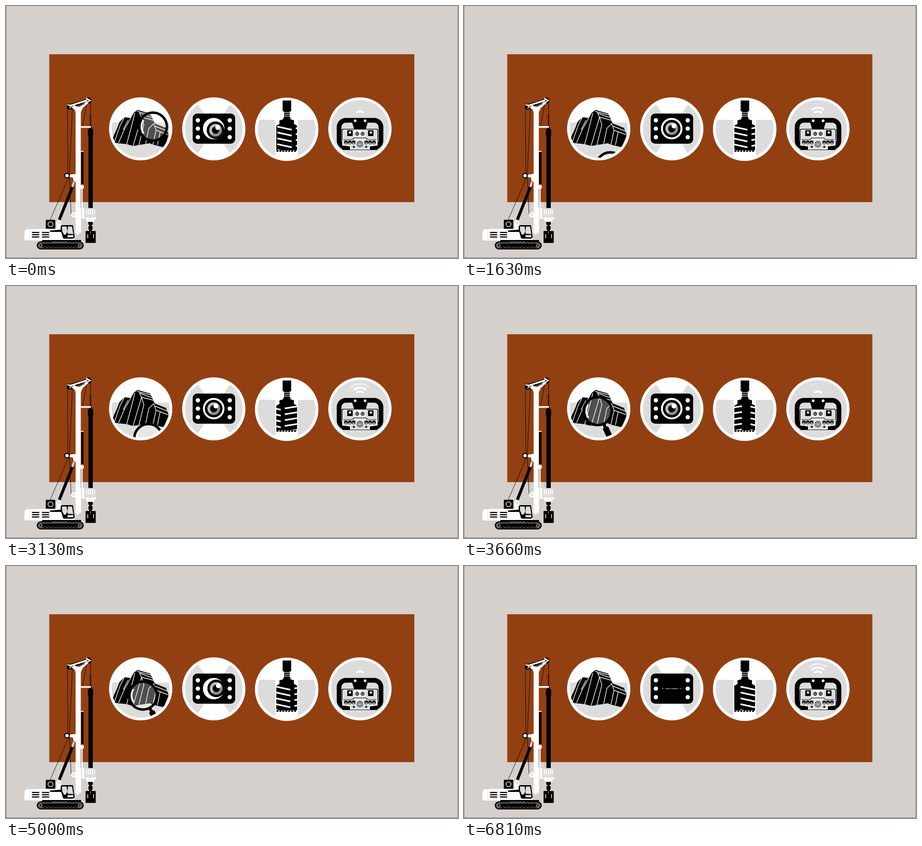
These frames come from a looping animation (1000 px wide and 560 px high, 6830 ms). An HTML page with a canvas:

```html
<!DOCTYPE html>
<html lang="en">
<head>
<meta charset="utf-8">
<title>Drilling rig</title>
<style>
html, body { margin: 0; width: 100%; height: 100%; overflow: hidden; background: #d5d0cc; }
canvas { display: block; width: 100vw; height: 100vh; }
</style>
</head>
<body>
<canvas id="stage"></canvas>
<script>
const LOOP = 6830, CYCLE = 4500, WIFI = 1226, SPIN = 838;
const BLACK = '#000', WHITE = '#fff', GREY = '#dcdcdc', BG = '#d5d0cc', RUST = '#924012';

const canvas = document.getElementById('stage');
const ctx = canvas.getContext('2d');
const dpr = Math.max(1, window.devicePixelRatio || 1);
canvas.width = 1000 * dpr;
canvas.height = 560 * dpr;

const clamp = v => Math.max(0, Math.min(1, v));
const ramp = (v, a, b) => clamp((v - a) / (b - a));

function rect(x, y, w, h, color) {
  ctx.fillStyle = color;
  ctx.fillRect(x, y, w, h);
}
function round(x, y, w, h, r, color) {
  ctx.beginPath();
  ctx.roundRect(x, y, w, h, r);
  ctx.fillStyle = color;
  ctx.fill();
}
function disc(x, y, r, color) {
  ctx.beginPath();
  ctx.arc(x, y, r, 0, Math.PI * 2);
  ctx.fillStyle = color;
  ctx.fill();
}
function arc(x, y, r, from, to, width, color) {
  ctx.beginPath();
  ctx.arc(x, y, r, from, to);
  ctx.lineWidth = width;
  ctx.strokeStyle = color;
  ctx.stroke();
}
const ring = (x, y, r, width, color) => arc(x, y, r, 0, Math.PI * 2, width, color);
function fill(path, color) {
  ctx.fillStyle = color;
  ctx.fill(new Path2D(path));
}
function line(path, width, color) {
  ctx.lineWidth = width;
  ctx.strokeStyle = color;
  ctx.stroke(new Path2D(path));
}
function within(shape, draw) {
  ctx.save();
  ctx.beginPath();
  shape();
  ctx.clip();
  draw();
  ctx.restore();
}
const inCircle = (x, y, r, draw) => within(() => ctx.arc(x, y, r, 0, Math.PI * 2), draw);

// Smooth curve through [time, x, y] keys.
function follow(keys, t) {
  let i = 0;
  while (i < keys.length - 2 && t > keys[i + 1][0]) i++;
  const a = keys[i], b = keys[i + 1];
  const p = keys[i - 1] || a, n = keys[i + 2] || b;
  const d = b[0] - a[0], s = clamp((t - a[0]) / d);
  return [1, 2].map(k => {
    const ma = (b[k] - p[k]) / (b[0] - p[0]) * d;
    const mb = (n[k] - a[k]) / (n[0] - a[0]) * d;
    const s2 = s * s, s3 = s2 * s;
    return (2 * s3 - 3 * s2 + 1) * a[k] + (s3 - 2 * s2 + s) * ma
      + (3 * s2 - 2 * s3) * b[k] + (s3 - s2) * mb;
  });
}

const lensKeys = [
  [-340, 308, 260], [0, 325, 268], [250, 321, 284], [500, 303, 288], [850, 296, 273],
  [1300, 307, 298], [1600, 321, 349], [1630, 323.5, 356], [1900, 345, 405],
  [2750, 340, 405], [3130, 315, 338], [3650, 296, 279], [3900, 297, 268],
  [4160, 308, 260], [4500, 325, 268], [4750, 321, 284]
];
const gazeKeys = [
  [-250, 0, 6], [0, 4, 3.5], [250, 5.5, 0], [500, 5.5, -0.5], [750, 5.5, -0.5],
  [1050, 0, 0], [1300, 0, 0], [3400, 0, 0], [3650, 0, 0], [3950, 0, 6],
  [4250, 0, 6], [4500, 4, 3.5], [4750, 5.5, 0]
];

function drawLens(x, y) {
  ctx.save();
  ctx.translate(x, y);
  disc(0, 0, 30, 'rgba(255,255,255,.31)');
  ring(0, 0, 31, 5.5, BLACK);
  arc(0, 0, 25, 2.5, 3.75, 3.5, WHITE);
  ctx.rotate(1.06 - (x - 305) * 0.008);
  rect(32, -3.5, 10, 7, BLACK);
  round(40, -6.5, 27, 13, 1.5, BLACK);
  ctx.restore();
}

function drawRock(u) {
  disc(298, 273, 70, WHITE);
  inCircle(298, 273, 64, () => {
    rect(230, 259, 140, 90, GREY);
    fill('M235 299L238 289L247 269L251 258L262 247L276 249L283 237L291 231L319 239L329 261L354 271L359 284V290L349 314L325 308L318 305L281 311L267 307L249 305L241 304L236 306Z', BLACK);
    line('M262 247L252 267L240 302M276 249L262 274L249 304M270 254L259 275M285 238L279 262L267 307M290 234L324 243M295 237L300 247L281 311M300 247L326 254M296 238L322 248M300 247L305 264L294 309M327 261L316 272L309 306M327 262L332 276L325 308M332 276L358 286M330 267L357 278M341 280L335 309', 1.4, WHITE);
    drawLens(...follow(lensKeys, u));
  });
}

function drawCamera(u) {
  disc(459.7, 273, 70, WHITE);
  inCircle(459.7, 273, 64, () => {
    fill('M460 273L420 211L380 211L380 335L420 335ZM460 273L500 211L540 211L540 335L500 335Z', GREY);
  });
  round(413, 239, 94, 67, 10, BLACK);
  for (const x of [424.5, 495]) for (const y of [254, 272.5, 291.5]) disc(x, y, 4.8, WHITE);

  const [gx, gy] = follow(gazeKeys, u);
  const lid = Math.max(0.04, clamp(Math.abs(u - 2310) / 130));
  ctx.save();
  ctx.translate(459.5, 272.5);
  ctx.scale(1, lid);
  inCircle(0, 0, 24, () => {
    disc(0, 0, 24, WHITE);
    ctx.translate(gx, gy);
    disc(0, 0, 19.5, BLACK);
    disc(0, 0, 14, '#bdbdbd');
    ctx.beginPath();
    ctx.arc(0, 0, 14, -0.9, 2.2);
    ctx.fillStyle = '#8c8c8c';
    ctx.fill();
    disc(0, 0, 8, BLACK);
    disc(5, -6, 5.5, WHITE);
  });
  ctx.restore();
}

function drawAuger(t) {
  disc(621, 274, 70.3, WHITE);
  inCircle(621, 274, 64, () => {
    rect(550, 253, 46, 90, GREY);
    rect(646, 253, 46, 90, GREY);
  });
  rect(612, 210, 19, 24, BLACK);
  rect(615, 234, 13, 17, BLACK);
  for (const y of [236, 240, 244]) rect(614, y, 15, 1.2, WHITE);
  fill('M614 248H629L630 252L637 254V262L644 266V320H598V266L605 262V254L613 252Z', BLACK);
  within(() => ctx.rect(597, 262, 48, 59), () => {
    const shift = (t / SPIN % 1) * 92 - 92;
    for (let k = 0; k < 3; k++) {
      const x = 600 + shift + k * 92;
      for (let y = 264; y < 330; y += 13) {
        line(`M${x} ${y + 4}l32 7`, 3.5, WHITE);
        line(`M${x + 41} ${y + 8}l32 -5`, 3.5, WHITE);
      }
    }
  });
  for (let x = 599; x < 644; x += 6.5) fill(`M${x} 320h5l-2 4h-4Z`, BLACK);
}

function drawRemote(t) {
  disc(783, 273, 70, WHITE);
  disc(783, 273, 64, GREY);

  const p = t % WIFI, fade = 1 - ramp(p, 1000, WIFI);
  const levels = [1, ramp(p, 240, 380) * fade, ramp(p, 580, 760) * fade];
  levels.forEach((level, i) => {
    ctx.globalAlpha = level;
    arc(783, 247, 12.7 + i * 8.4, -Math.PI / 2 - 0.75, -Math.PI / 2 + 0.75, 4, WHITE);
  });
  ctx.globalAlpha = 1;

  ctx.beginPath();
  ctx.roundRect(737, 254, 92.5, 60, 15);
  ctx.lineWidth = 10.5;
  ctx.strokeStyle = BLACK;
  ctx.stroke();
  round(743, 273, 80, 47, 4, BLACK);
  round(744.5, 274.5, 77, 24, 3, WHITE);
  round(746, 276, 74, 22, 2, GREY);
  fill('M744 297H822V310L805 312V319H761V312L744 310Z', WHITE);
  fill('M746 298H820V309L804 311V318H762V311L746 309Z', GREY);
  fill('M763 249H803L796 273H770Z', BLACK);
  for (const x of [772.5, 794.5]) disc(x, 255, 3, WHITE);
  for (const x of [755, 801]) {
    round(x, 276, 12, 13, 1, BLACK);
    disc(x + 6, 281, 2.6, WHITE);
  }
  rect(771, 277, 24, 14, WHITE);
  for (const x of [777, 789]) {
    disc(x, 284, 4.4, BLACK);
    disc(x, 284, 3, '#aaa');
    rect(x - 0.7, 282, 1.4, 4, BLACK);
  }
  line('M746 297H766L770 293H796L800 297H820', 1.2, BLACK);
  for (const x of [752, 760.5, 769, 797, 805.5, 814]) {
    disc(x, 303, 4.2, BLACK);
    disc(x, 304, 2.4, GREY);
    rect(x - 1.2, 299, 2.4, 5, BLACK);
  }
  disc(783, 307, 7, WHITE);
  ring(783, 307, 6, 1.4, BLACK);
  ring(783, 307, 2.8, 1.2, BLACK);
  for (const x of [769.5, 797]) disc(x, 313, 2.2, BLACK);
}

function drawMast() {
  line('M136 226L137 372M147 226L140 374L144 462M139 380L97 477M179 214L169 268M187 212V242M166 325V450', 0.9, BLACK);
  line('M168 400V450', 3, WHITE);
  line('M150 391L146 405', 4, GREY);
  line('M147 402L118 475', 6.5, BLACK);

  // kelly bar
  for (let y = 241; y < 268; y += 3.5) rect(185.5, y, 3, 2.2, BLACK);
  rect(182.3, 274, 9.7, 176, BLACK);
  fill('M182 273H192L193 276V286L192 289H182L181 286V276Z', BLACK);
  rect(184.5, 268, 5, 6, BLACK);
  rect(167, 323, 4.5, 72, BLACK);
  rect(165.5, 322, 6, 2, WHITE);

  rect(154, 230, 11.5, 274, WHITE);
  fill('M150 226H170L165.5 236H154ZM165 267H188V270.5H165Z', WHITE);
  disc(168, 402, 4.5, WHITE);
  fill('M140 375L155 373V391L150 390L148 381L140 380Z', WHITE);
  disc(135, 377, 6.2, BLACK);
  disc(135, 377, 3.8, WHITE);

  // head
  disc(141, 224, 6.5, BLACK);
  disc(182, 210, 7, BLACK);
  line('M141 222L182 210', 8, BLACK);
  fill('M134 219L144 219L178 208L177 203L189 210L180 215L179 212L146 222L141 229L140 222Z', WHITE);
  fill('M145 225L151 220L157 224L163 222L177 213L183 215L168 228L160 231L150 229Z', WHITE);
  line('M160 224L174 217', 1.3, BLACK);
  disc(141, 224, 1.5, BLACK);
  disc(181, 210, 1.5, BLACK);
}

function drawDrive() {
  rect(166, 449, 30, 25, GREY);
  rect(154, 449, 12, 50, WHITE);
  rect(168, 449, 5, 23, WHITE);
  for (let x = 177; x < 196; x += 4.5) rect(x, 452, 1.8, 11, WHITE);
  rect(195, 461, 4, 9, GREY);
  fill('M175 470H200V473L196 474V479H178V474L175 473Z', WHITE);
  disc(150, 464, 6, WHITE);
  disc(150, 464, 2.7, GREY);
  fill('M153 498H166V503H161V508H156V503H153Z', WHITE);
  rect(182, 480, 10, 6, BLACK);
  rect(184.5, 486, 5, 5, BLACK);
  rect(182.5, 489, 9, 8, BLACK);
  rect(184, 497, 6, 4, BLACK);
  round(176, 500, 22.5, 26.5, 1, BLACK);
  rect(180, 507, 1.5, 9, WHITE);
  rect(193, 507, 1.5, 9, WHITE);
  rect(186.5, 501, 1, 4, WHITE);
}

function drawCarrier() {
  round(88, 475, 21, 22, 2, BLACK);
  ring(98.5, 485, 5.5, 1.6, GREY);
  fill('M112 496V480L116 475L122 479V486L126 490V498Z', WHITE);
  disc(118, 482, 2.5, GREY);
  fill('M42 498L46 496L89 495H124V515H152V519L147 521H42L40 514Z', WHITE);
  line('M52 497V520M74 496V502', 0.7, GREY);
  for (const x of [57, 79]) for (const y of [502, 507, 512]) fill(`M${x} ${y}h16l1 2.5h-16Z`, BLACK);
  fill('M97 499L121 497V489L124 487H148L152 514L149 517H127L122 502H98Z', BLACK);
  fill('M124 490H134L136 501L132 508H128L124 499Z', GREY);
  fill('M137 490H146L149 507L136 506Z', GREY);
  rect(136, 509, 13, 5, GREY);

  rect(80, 520, 86, 4, BLACK);
  round(68, 523, 104, 18, 9, BLACK);
  ctx.beginPath();
  ctx.roundRect(71.5, 526.5, 97, 11, 5.5);
  ctx.lineWidth = 1;
  ctx.strokeStyle = GREY;
  ctx.stroke();
  for (const x of [77, 163]) ring(x, 532, 3, 1.1, GREY);
  rect(83, 527, 74, 4, BLACK);
  for (let x = 86; x < 157; x += 8.5) {
    disc(x, 535, 3.3, BLACK);
    disc(x, 535, 0.9, '#888');
  }
  rect(102, 523.5, 34, 1.3, '#777');
}

function draw(t) {
  const u = t % CYCLE;
  ctx.setTransform(dpr, 0, 0, dpr, 0, 0);
  rect(0, 0, 1000, 560, BG);
  rect(0, 0, 0.8, 560, '#777');
  rect(999.2, 0, 0.8, 560, '#777');
  rect(0, 559.2, 1000, 0.8, '#666');
  rect(95.7, 107.2, 807.7, 328.6, RUST);
  drawRock(u);
  drawCamera(u);
  drawAuger(t);
  drawRemote(t);
  drawMast();
  drawDrive();
  drawCarrier();
}

const start = performance.now();
function tick() {
  draw((performance.now() - start) % LOOP);
  requestAnimationFrame(tick);
}
tick();
</script>
</body>
</html>
```
